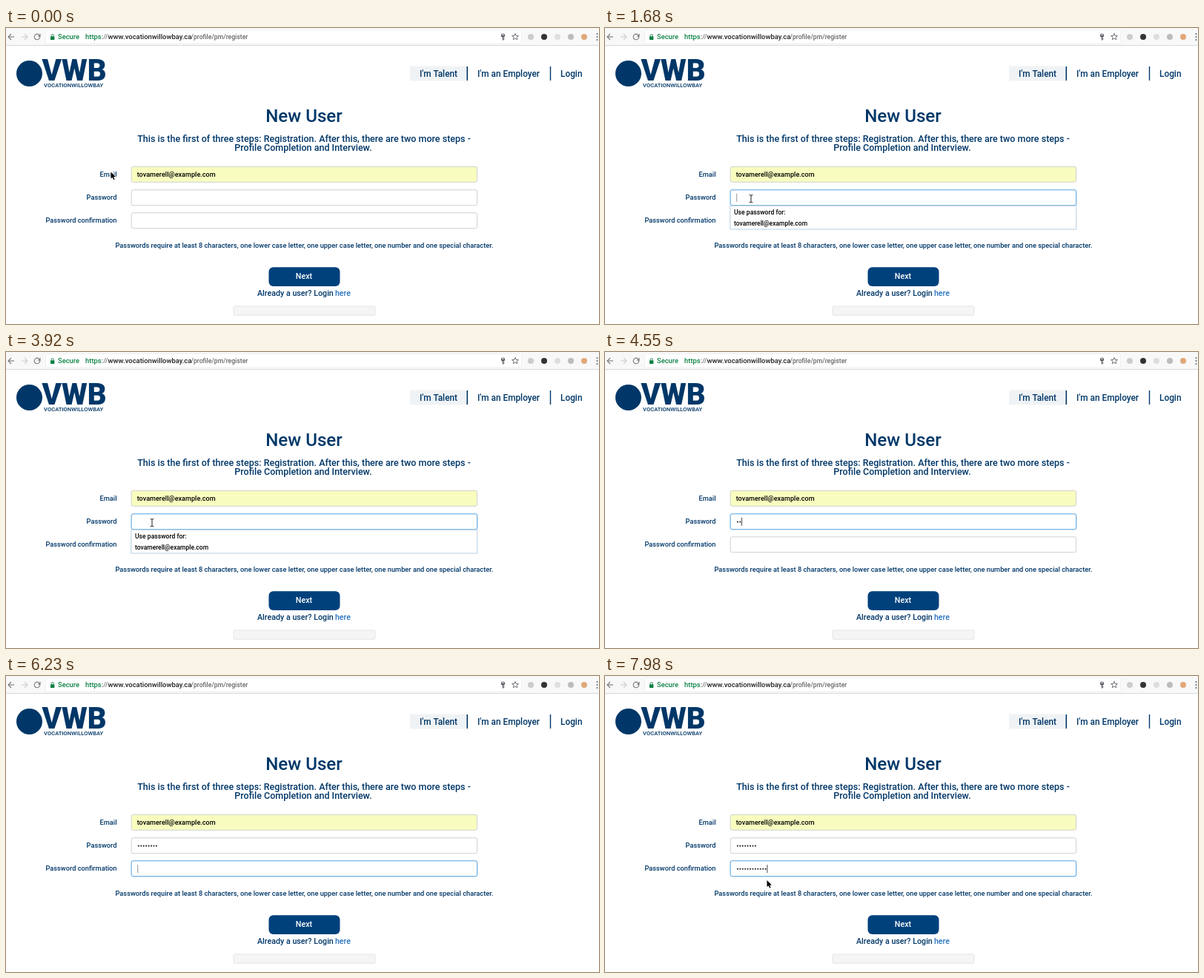
An HTML page with a canvas that plays this animation: 800x400 px, repeating every 8 s.

```html
<!DOCTYPE html>
<html lang="en">
<head>
<meta charset="utf-8">
<title>New User</title>
<style>
  html, body { margin: 0; width: 100%; height: 100%; overflow: hidden; background: #fff; }
  canvas { display: block; width: 800px; height: 400px; }
</style>
</head>
<body>
<canvas id="stage"></canvas>
<script>
const canvas = document.getElementById('stage');
const ctx = canvas.getContext('2d');
const ratio = window.devicePixelRatio || 1;
canvas.width = 800 * ratio;
canvas.height = 400 * ratio;

const LOOP = 8000, STEP = 70;
const NAVY = '#003768', BLACK = '#000', GREEN = '#0b8043', GREY = '#5f6368';
const EMAIL = 'tovamerell@example.com';
const DOT_GAP = 3.43;

// Times in ms
const CLICK = 1190, TAB = 6160;
const first = { start: 4275, gap: 165, total: 8 };
const second = { start: 6525, gap: 115, total: 12 };
const lastKey = k => k.start + k.gap * (k.total - 1);

function text(str, x, y, size, color = NAVY, weight = 450, align = 'left') {
  ctx.font = `${weight} ${size}px Roboto, "Open Sans", sans-serif`;
  ctx.fillStyle = color;
  ctx.textAlign = align;
  ctx.fillText(str, x, y);
}

function box(x, y, w, h, r, fill, stroke, line = 1) {
  ctx.beginPath();
  ctx.roundRect(x, y, w, h, r);
  if (fill) { ctx.fillStyle = fill; ctx.fill(); }
  if (stroke) { ctx.strokeStyle = stroke; ctx.lineWidth = line; ctx.stroke(); }
}

function disc(x, y, r, color) {
  ctx.fillStyle = color;
  ctx.beginPath();
  ctx.arc(x, y, r, 0, Math.PI * 2);
  ctx.fill();
}

function path(points, color, width, closed) {
  ctx.beginPath();
  points.forEach(([x, y]) => ctx.lineTo(x, y));
  if (closed) ctx.closePath();
  ctx.strokeStyle = color;
  ctx.lineWidth = width;
  ctx.stroke();
}

function arrowIcon(x, dir, color) {
  path([[x - 4 * dir, 12], [x + 4 * dir, 12]], color, 1.1);
  path([[x, 8], [x + 4 * dir, 12], [x, 16]], color, 1.1);
}

function toolbar() {
  ctx.fillStyle = '#f8f8f8';
  ctx.fillRect(0, 0, 800, 24);
  ctx.fillStyle = '#d9d9d9';
  ctx.fillRect(0, 23, 800, 1);
  box(53.5, 2.5, 642, 18.5, 2, '#fff', '#f0f0f0');

  arrowIcon(7, -1, '#777');
  arrowIcon(25, 1, '#cfcfcf');
  ctx.beginPath();
  ctx.arc(42, 12, 3.8, -0.6, Math.PI * 1.72, false);
  ctx.strokeStyle = '#777';
  ctx.lineWidth = 1.1;
  ctx.stroke();
  ctx.fillStyle = '#777';
  ctx.beginPath();
  ctx.moveTo(46.5, 7.5);
  ctx.lineTo(46.5, 11.5);
  ctx.lineTo(42.5, 11.5);
  ctx.fill();

  // Padlock
  box(60, 11.2, 5.4, 4.8, 0.6, GREEN);
  ctx.beginPath();
  ctx.arc(62.7, 10.4, 1.7, Math.PI, 0);
  ctx.lineTo(64.4, 11.5);
  ctx.moveTo(61, 10.4);
  ctx.lineTo(61, 11.5);
  ctx.strokeStyle = GREEN;
  ctx.lineWidth = 0.9;
  ctx.stroke();

  text('Secure', 70, 15.4, 9.4, GREEN);
  const address = [['https', GREEN], ['://', '#777'], ['www.vocationwillowbay.ca', '#222']];
  let x = 107;
  for (const [part, color] of address) {
    text(part, x, 15.4, 9.45, color);
    x += ctx.measureText(part).width;
  }
  text('/profile/pm/register', 326.3, 15.4, 8.65, '#666', 450, 'right');

  // Key
  disc(670.5, 10, 2.6, GREY);
  disc(670.5, 9.2, 0.9, '#fff');
  ctx.fillStyle = GREY;
  ctx.fillRect(669.8, 12, 1.4, 4.6);
  ctx.fillRect(671, 14, 1.4, 1.4);

  const star = Array.from({ length: 10 }, (_, i) => {
    const a = -Math.PI / 2 + i * Math.PI / 5, r = i % 2 ? 2 : 4.6;
    return [687 + r * Math.cos(a), 12 + r * Math.sin(a)];
  });
  path(star, GREY, 0.9, true);

  [[708, '#cccccc'], [726, '#333'], [744, '#dedede'], [762, '#bcbcbc'], [780, '#e0a878']]
    .forEach(([cx, color]) => disc(cx, 12, 4, color));
  [8, 12, 16].forEach(y => disc(797.5, y, 1, GREY));
}

function header() {
  disc(31.5, 61.5, 17.5, NAVY);
  text('VWB', 48.5, 71.2, 40, NAVY, 900);
  text('VOCATIONWILLOWBAY', 51, 80.4, 7.65, NAVY, 500);

  ctx.fillStyle = '#f0f3f5';
  ctx.fillRect(545, 51.5, 77, 20);
  ctx.fillStyle = NAVY;
  ctx.fillRect(621.5, 52, 1.6, 19);
  ctx.fillRect(733.8, 52, 1.4, 19);
  text("I'm Talent", 558, 65.6, 11.85);
  text("I'm an Employer", 636, 65.6, 11.85);
  text('Login', 748, 65.6, 11.85);
}

function field(y, focused, fill = '#fff') {
  if (focused) box(169, y, 467, 21.5, 3, null, 'rgba(102,175,233,.2)', 2);
  box(169.2, y + 0.3, 466.4, 20.9, 2.5, fill, focused ? '#62a8e0' : '#cdd0d3');
}

function page() {
  text('New User', 402, 126.8, 24.1, NAVY, 500, 'center');
  text('This is the first of three steps: Registration. After this, there are two more steps -',
    402, 153.6, 12.52, NAVY, 550, 'center');
  text('Profile Completion and Interview.', 401, 165.8, 12.52, NAVY, 550, 'center');

  text('Email', 149.5, 200.6, 9.25, NAVY, 500, 'right');
  text('Password', 149.5, 231.8, 9.25, NAVY, 500, 'right');
  text('Password confirmation', 149.5, 263.1, 9.25, NAVY, 500, 'right');
  text('Passwords require at least 8 characters, one lower case letter, one upper case letter, ' +
    'one number and one special character.', 402.4, 297, 9.27, NAVY, 500, 'center');

  box(354.5, 323.3, 96, 25.6, 6, '#00417c');
  text('Next', 402, 339.4, 10.7, '#fff', 500, 'center');
  text('Already a user? Login ', 339, 362, 10.7);
  text('here', 465, 362, 10.7, '#2a75c0', 450, 'right');
  box(307, 376, 191, 12.2, 2, '#f5f5f5', '#e4e4e4');
}

function typed(keys, t) {
  return Math.max(0, Math.min(keys.total, Math.floor((t - keys.start) / keys.gap) + 1));
}

function dots(count, y) {
  for (let i = 0; i < count; i++) disc(178.9 + i * DOT_GAP, y, 1.05, '#222');
}

function caret(count, y, since) {
  if (since > 0 && since % 1000 >= 500) return;
  ctx.fillStyle = count ? '#333' : '#888';
  ctx.fillRect(177.3 + count * DOT_GAP, y - 5.5, 0.9, 11);
}

function form(t) {
  const a = typed(first, t), b = typed(second, t);
  const onFirst = t >= CLICK && t < TAB, onSecond = t >= TAB;

  field(187, false, '#f8fdbf');
  text(EMAIL, 176.7, 200.8, 9.1, BLACK, 500);
  field(249.5, onSecond);
  field(218.5, onFirst);
  dots(a, 229.6);
  dots(b, 260.8);
  if (onFirst) caret(a, 229.3, a ? t - lastKey(first) : t - CLICK - 60);
  if (onSecond) caret(b, 260.6, b ? t - lastKey(second) : t - TAB);

  if (onFirst && !a) {
    box(168.8, 240.3, 467, 31.7, 0, '#fff', '#b4d0e2');
    text('Use password for:', 174, 251.7, 8.6, BLACK, 500);
    text(EMAIL, 174, 267.3, 8.5, BLACK, 500);
  }
}

function pointer(x, y) {
  const shape = [[0, 0], [0, 9], [2.1, 7.2], [3.6, 10.6], [5.1, 9.9], [3.6, 6.7], [6.3, 6.5]];
  ctx.save();
  ctx.translate(x, y);
  ctx.lineJoin = 'round';
  path(shape, '#fff', 1.4, true);
  ctx.fillStyle = '#000';
  ctx.fill();
  ctx.restore();
}

function beam(x, y) {
  path([[x, y - 5], [x, y + 5]], '#222', 1);
  [-1, 1].forEach(s => path([[x - 2.5, y + 5.3 * s], [x, y + 4.5 * s], [x + 2.5, y + 5.3 * s]], '#222', 0.9));
}

function glide(t, start, end, from, to) {
  const p = Math.max(0, Math.min(1, (t - start) / (end - start)));
  const e = p * p * (3 - 2 * p);
  return from.map((v, i) => v + (to[i] - v) * e);
}

function mouse(t) {
  const rest = [197, 230.7];
  const leaving = lastKey(second);
  if (t >= first.start && t < leaving) return;
  const [x, y] = t < first.start
    ? glide(t, 280, 980, [141.5, 194.5], rest)
    : glide(t, leaving, 7980, rest, [218.5, 276]);
  const inField = x > 169 && [187, 218.5, 249.5].some(top => y > top && y < top + 21.5);
  (inField ? beam : pointer)(x, y);
}

function draw(now) {
  const t = Math.floor(now % LOOP / STEP) * STEP;
  ctx.setTransform(ratio, 0, 0, ratio, 0, 0);
  ctx.fillStyle = '#fff';
  ctx.fillRect(0, 0, 800, 400);
  toolbar();
  header();
  page();
  form(t);
  mouse(t);
}

let origin;
function tick(now) {
  origin ??= now;
  draw(now - origin);
  requestAnimationFrame(tick);
}
requestAnimationFrame(tick);
</script>
</body>
</html>
```
